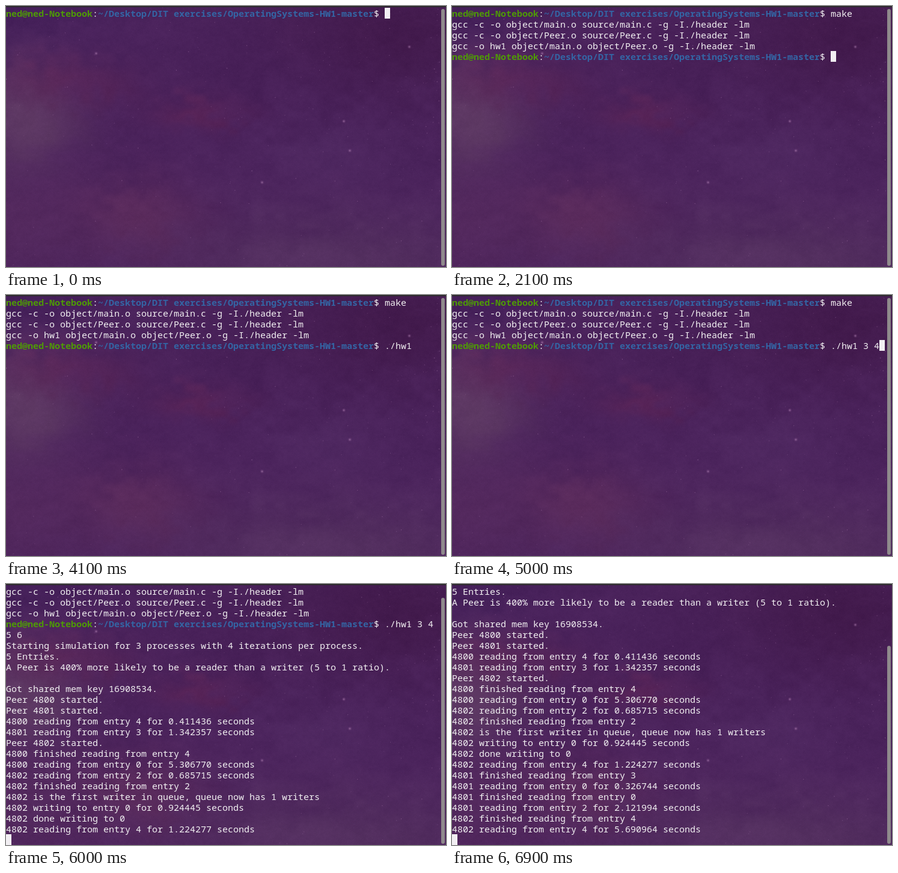
An HTML page with a canvas that plays this animation: 732 px wide and 435 px high, repeating every 8000 ms.

```html
<!DOCTYPE html>
<html lang="en">
<head>
<meta charset="utf-8">
<title>Terminal</title>
<style>
  html, body { margin: 0; width: 100%; height: 100%; overflow: hidden; background: #4b225b; }
  canvas { position: absolute; left: 0; top: 0; }
  #edge { position: absolute; left: 0; top: 0; width: 100%; height: 2px; background: #2d2a2e; }
  #term {
    position: absolute; left: 0; top: 3px; width: 723px; height: 432px; margin: 0;
    overflow: hidden; white-space: pre; color: #f2f0f2;
    font: 15px/18px "Noto Sans Mono", "DejaVu Sans Mono", monospace;
    font-variant-ligatures: none;
  }
  #term div { height: 18px; }
  #term b { font-weight: 700; }
  .user { color: #4e9a06; }
  .path { color: #3465a4; }
  #cursor { position: absolute; width: 9px; height: 18px; background: #f2eff3; }
  #bar { position: absolute; left: 724px; bottom: 2px; width: 6px; border-radius: 3px; background: #8f8a8c; }
</style>
</head>
<body>
<canvas id="sky" width="732" height="435"></canvas>
<div id="edge"></div>
<div id="term"></div>
<div id="cursor"></div>
<div id="bar"></div>
<script>
const W = 732, H = 435, CELL = 9, LINE = 18, TOP = 3, ROWS = 24, LOOP = 8000;
const $ = id => document.getElementById(id);

// A leading "$ " stands for the shell prompt.
const USER = 'ned@ned-Notebook';
const PATH = '~/Desktop/DIT exercises/OperatingSystems-HW1-master';
const PROMPT = `<b class="user">${USER}</b>:<b class="path">${PATH}</b>$ `;
const PROMPT_COLS = USER.length + PATH.length + 3;

const LOG = `$ make
gcc -c -o object/main.o source/main.c -g -I./header -lm
gcc -c -o object/Peer.o source/Peer.c -g -I./header -lm
gcc -o hw1 object/main.o object/Peer.o -g -I./header -lm
$ ./hw1 3 4
5 6
Starting simulation for 3 processes with 4 iterations per process.
5 Entries.
A Peer is 400% more likely to be a reader than a writer (5 to 1 ratio).

Got shared mem key 16908534.
Peer 4800 started.
Peer 4801 started.
4800 reading from entry 4 for 0.411436 seconds
4801 reading from entry 3 for 1.342357 seconds
Peer 4802 started.
4800 finished reading from entry 4
4800 reading from entry 0 for 5.306770 seconds
4802 reading from entry 2 for 0.685715 seconds
4802 finished reading from entry 2
4802 is the first writer in queue, queue now has 1 writers
4802 writing to entry 0 for 0.924445 seconds
4802 done writing to 0
4802 reading from entry 4 for 1.224277 seconds
4801 finished reading from entry 3
4801 reading from entry 0 for 0.326744 seconds
4801 finished reading from entry 0
4801 reading from entry 2 for 2.121994 seconds
4802 finished reading from entry 4
4802 reading from entry 4 for 5.690964 seconds`.split('\n');

// [start ms, finished lines, current line, cursor shown, scrollbar top]
const STEPS = [
  [0, 0, '$ ', 1, 5],
  [100, 0, '$ ', 0, 5],
  [600, 0, '$ m', 1, 5],
  [700, 0, '$ ma', 1, 5],
  [1000, 0, '$ make', 1, 5],
  [1100, 0, '$ make ', 1, 5],
  [1200, 2, '', 1, 5],
  [1300, 4, '$ ', 1, 5],
  [1700, 4, '$ ', 0, 5],
  [2100, 4, '$ ', 1, 5],
  [2200, 4, '$ .', 1, 5],
  [2500, 4, '$ ./', 1, 5],
  [3000, 4, '$ ./h', 1, 5],
  [3300, 4, '$ ./hw', 1, 5],
  [3500, 4, '$ ./hw1 ', 1, 5],
  [4100, 4, '$ ./hw1 ', 0, 5],
  [4200, 4, '$ ./hw1 3', 1, 5],
  [4500, 4, '$ ./hw1 3 ', 1, 5],
  [5000, 4, '$ ./hw1 3 4', 1, 5],
  [5200, 5, '5', 1, 5],
  [5400, 5, '5 ', 1, 5],
  [5700, 5, '5 6', 1, 23],
  [6000, 24, '', 1, 23],
  [6300, 24, '', 0, 23],
  [6700, 24, '', 0, 103],
  [6900, 30, '', 1, 103]
];

const isPrompt = line => line.startsWith('$ ');
const toHtml = line => '<div>' + (isPrompt(line) ? PROMPT + line.slice(2) : line) + '</div>';

function show([, done, line, cursorOn, barTop]) {
  const first = Math.max(0, done - ROWS + 1);
  $('term').innerHTML = [...LOG.slice(first, done), line].map(toHtml).join('');
  const col = isPrompt(line) ? PROMPT_COLS + line.length - 2 : line.length;
  const cursor = $('cursor').style;
  cursor.left = col * CELL + 'px';
  cursor.top = TOP + (done - first) * LINE + 'px';
  cursor.visibility = cursorOn ? 'visible' : 'hidden';
  $('bar').style.top = barTop + 'px';
}

// Nebula wallpaper: soft colour clouds, ragged by value noise, plus faint stars.
function hash(x, y) {
  let h = Math.imul(x, 374761393) + Math.imul(y, 668265263);
  h = Math.imul(h ^ (h >>> 13), 1274126177);
  return ((h ^ (h >>> 16)) >>> 0) / 4294967296;
}
function noise(x, y) {
  const i = Math.floor(x), j = Math.floor(y), ease = t => t * t * (3 - 2 * t);
  const u = ease(x - i), v = ease(y - j);
  const a = hash(i, j), b = hash(i + 1, j), c = hash(i, j + 1), d = hash(i + 1, j + 1);
  return a + (b - a) * u + (c - a) * v + (a - b - c + d) * u * v - 0.5;
}

// [x, y, radius x, radius y, r, g, b, strength]
const CLOUDS = [
  [20, 20, 150, 60, 66, 30, 88, 0.7],
  [660, 40, 210, 110, 65, 25, 74, 0.85],
  [385, 115, 90, 60, 68, 29, 84, 0.55],
  [20, 190, 85, 90, 98, 62, 102, 0.85],
  [95, 125, 100, 35, 94, 38, 86, 0.6],
  [310, 175, 75, 25, 96, 37, 86, 0.6],
  [215, 350, 100, 65, 96, 45, 92, 0.75],
  [30, 370, 110, 90, 86, 42, 92, 0.6],
  [540, 250, 110, 60, 80, 42, 98, 0.6],
  [540, 420, 260, 80, 87, 52, 97, 0.75]
];

function paintSky() {
  const ctx = $('sky').getContext('2d');
  const img = ctx.createImageData(W, H);
  for (let y = 0, p = 0; y < H; y++) {
    for (let x = 0; x < W; x++, p += 4) {
      const wide = noise(x / 60, y / 42), mid = noise(x / 19 + 40, y / 14);
      const fine = noise(x / 5, y / 4 + 90), grain = hash(x, y + 999) - 0.5;
      const wx = x + wide * 50 + mid * 22, wy = y + mid * 28 + wide * 20;
      let r = 75, g = 35, b = 92;
      for (const [cx, cy, rx, ry, cr, cg, cb, k] of CLOUDS) {
        const d = ((wx - cx) / rx) ** 2 + ((wy - cy) / ry) ** 2;
        if (d > 6) continue;
        const a = k * Math.exp(-d);
        r += (cr - r) * a;
        g += (cg - g) * a;
        b += (cb - b) * a;
      }
      const tone = wide * 4 + mid * 4 + fine * 3 + grain * 4;
      img.data[p] = r + tone;
      img.data[p + 1] = g + tone * 0.8;
      img.data[p + 2] = b + tone;
      img.data[p + 3] = 255;
    }
  }
  ctx.putImageData(img, 0, 0);

  const star = (x, y, size, alpha) => {
    ctx.fillStyle = `rgba(178, 130, 180, ${alpha})`;
    ctx.beginPath();
    ctx.arc(x, y, size, 0, 7);
    ctx.fill();
  };
  for (let i = 0; i < 260; i++) {
    const x = (1 - hash(i, 7) ** 1.5) * 722, y = hash(i, 8) ** 1.4 * H;
    star(x, y, 0.5 + hash(i, 9) * 0.4, 0.12 + hash(i, 10) * 0.25);
  }
  for (const [x, y] of [[150, 79], [671, 68], [562, 192], [426, 294], [572, 241]]) {
    star(x, y, 3, 0.15);
    star(x, y, 1.5, 0.45);
  }
}

let current = null;
function frame(now) {
  const t = now % LOOP;
  const step = STEPS.findLast(s => s[0] <= t) || STEPS[0];
  if (step !== current) show(current = step);
  requestAnimationFrame(frame);
}

paintSky();
show(current = STEPS[0]);
requestAnimationFrame(frame);
</script>
</body>
</html>
```
